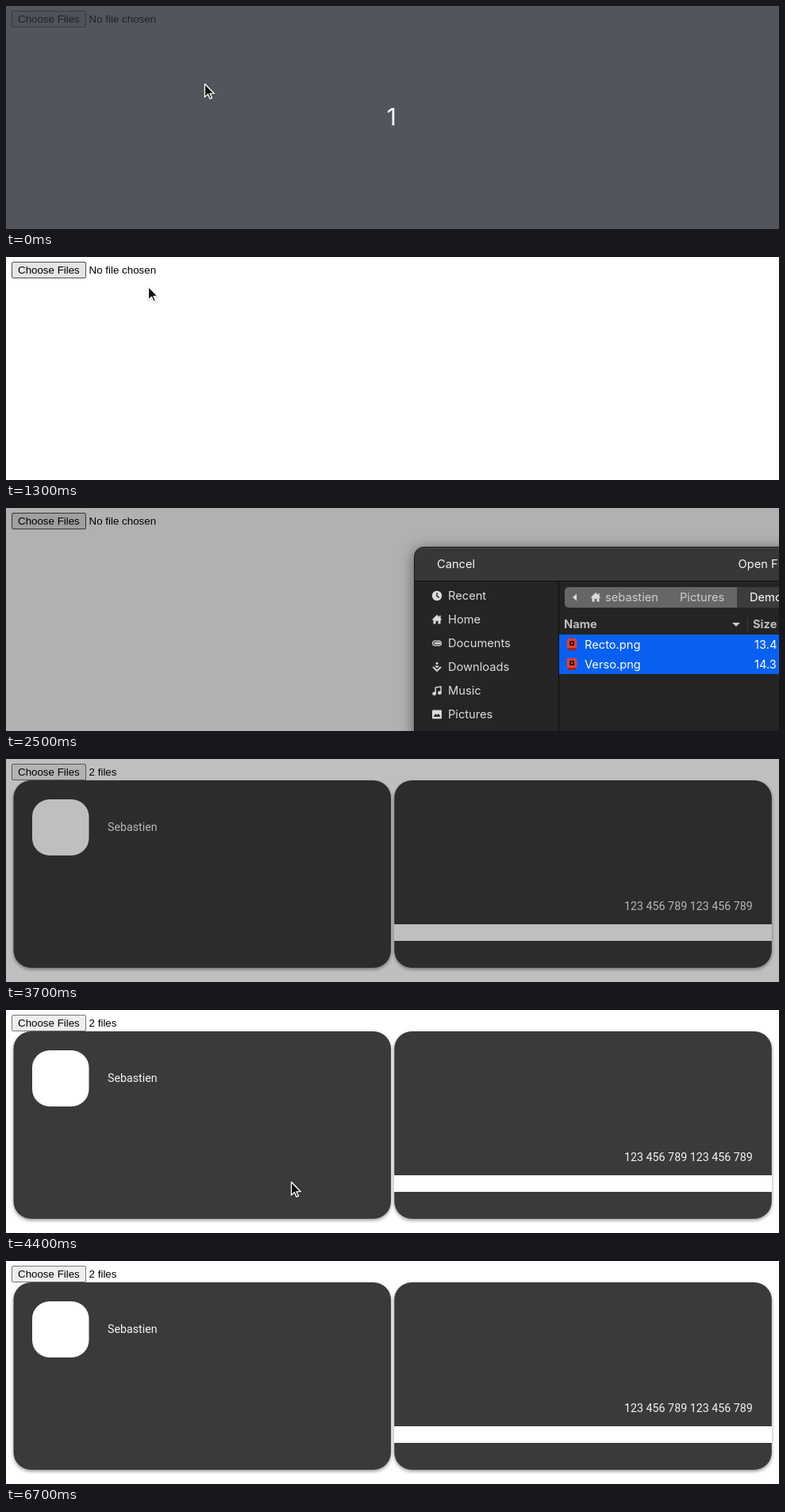
An HTML page with a canvas for the animation above (7.1 s loop, 974 by 282 pixels).

```html
<!DOCTYPE html>
<html lang="en">
<head>
<meta charset="utf-8">
<title>File upload preview</title>
<style>
  html, body { margin: 0; width: 100%; height: 100%; overflow: hidden; background: #fff; }
  canvas { display: block; width: 974px; height: 282px; }
</style>
</head>
<body>
<canvas id="stage" width="974" height="282"></canvas>
<script>
const W = 974, H = 282, LOOP = 7100, STEP = 100;
const ctx = document.getElementById('stage').getContext('2d');
const UI = '14.667px Inter, sans-serif';
const FORM = '13.333px "Liberation Sans", Arial, sans-serif';
const CARD = '14.25px Roboto, sans-serif';
const INK = '#dcdcdc', BASE = '#252525';

// Pointer moves between rests; each starts where the last one ended
const moves = [
  { from: 400, to: 1000, x: 58, y: 16 },
  { from: 1200, to: 1500, x: 525, y: 97 },
  { from: 1500, to: 2000, x: 745, y: 198 },
  { from: 2300, to: 2600, x: 1060, y: 150 },
  { from: 3700, to: 4400, x: 359, y: 217 },
  { from: 4400, to: 5200, x: 59, y: -4 },
  { from: 5200, to: 5700, x: 57, y: -22 },
  { from: 6100, to: 6300, x: 55, y: 3 },
  { from: 6400, to: 6700, x: 55, y: -24 }
];

const progress = (t, from, to) => Math.max(0, Math.min(1, (t - from) / (to - from)));
const smooth = k => k * k * (3 - 2 * k);

function pointer(t) {
  let x = 250, y = 98;
  for (const m of moves) {
    const k = smooth(progress(t, m.from, m.to));
    x += (m.x - x) * k;
    y += (m.y - y) * k;
  }
  return [Math.round(x), Math.round(y)];
}

function rect(x, y, w, h, color) {
  ctx.fillStyle = color;
  ctx.fillRect(x, y, w, h);
}

function round(x, y, w, h, r, color) {
  ctx.fillStyle = color;
  ctx.beginPath();
  ctx.roundRect(x, y, w, h, r);
  ctx.fill();
}

function disc(x, y, r, color) {
  round(x - r, y - r, 2 * r, 2 * r, r, color);
}

function trace(points) {
  ctx.beginPath();
  for (let i = 0; i < points.length; i += 2) ctx.lineTo(points[i], points[i + 1]);
}

function poly(points, color) {
  trace(points);
  ctx.fillStyle = color;
  ctx.fill();
}

function line(points, color, width) {
  trace(points);
  ctx.strokeStyle = color;
  ctx.lineWidth = width;
  ctx.stroke();
}

function text(str, x, y, font, color) {
  ctx.font = font;
  ctx.fillStyle = color;
  ctx.fillText(str, x, y);
}

function withShadow(color, blur, dy, paint) {
  ctx.save();
  ctx.shadowColor = color;
  ctx.shadowBlur = blur;
  ctx.shadowOffsetY = dy;
  paint();
  ctx.restore();
}

function fileInput(hover, label) {
  round(7, 6, 94, 21, 2.5, hover ? '#4f4f4f' : '#767676');
  round(8, 7, 92, 19, 1.5, hover ? '#e5e5e5' : '#efefef');
  text('Choose Files', 15, 21, FORM, '#000');
  text(label, 104.6, 21, FORM, '#000');
}

function cards() {
  for (const x of [9.5, 489.3]) {
    withShadow('rgba(0,0,0,.42)', 4, 2, () => round(x, 27, 475.5, 237, 22, '#3a3a3a'));
  }
  round(33, 51, 71.5, 71, 22, '#fff');
  text('Sebastien', 128, 91, CARD, '#f4f4f4');
  text('123 456 789 123 456 789', 779, 191, CARD, '#f4f4f4');
  rect(489, 209, 476, 21, '#fff');
}

// Icons are drawn around their own centre
const icons = {
  Recent() {
    disc(0, 0, 6.2, INK);
    line([0, -3.8, 0, 0.3, 2.8, 2.4], BASE, 1.5);
  },
  Home() {
    poly([-6.5, 0.5, 0, -6, 6.5, 0.5], INK);
    rect(-4.5, 0, 3, 5.5, INK);
    rect(1.5, 0, 3, 5.5, INK);
    rect(-1.5, 0, 3, 2, INK);
    rect(3, -5, 1.6, 4, INK);
  },
  Documents() {
    round(-6, -3.5, 12, 7, 3.5, INK);
    round(-4.8, -2.3, 9.6, 4.6, 2.3, BASE);
    round(-3.5, -1.2, 8, 2.4, 1.2, INK);
  },
  Downloads() {
    disc(0, -4.5, 1.5, INK);
    poly([-3, -1.5, 3, -1.5, 0, 1.5], INK);
    line([-5, 0, 0, 5, 5, 0], INK, 1.8);
  },
  Music() {
    disc(-3.4, 3.8, 2.3, INK);
    disc(3.4, 2.8, 2.3, INK);
    line([-1.8, 4, -1.8, -4, 5, -5.2, 5, 3], INK, 1.4);
  },
  Pictures() {
    round(-6, -5.5, 12, 11, 1, INK);
    poly([-4.5, 3, -1.8, -1, 0, 1, 2, -1, 4.5, 3], BASE);
  }
};

function icon(name, x, y) {
  ctx.save();
  ctx.translate(x, y);
  icons[name]();
  ctx.restore();
}

function fileRow(y, name, size, picked) {
  ctx.globalAlpha = picked;
  rect(697, y, 277, 25, '#0860f2');
  ctx.globalAlpha = 1;
  rect(708, y + 17, 10, 3, '#a3231a');
  round(707, y + 5, 12, 12, 1.5, '#f83c28');
  rect(710, y + 8, 6, 6, '#3a1513');
  rect(712, y + 10, 2, 2, '#f83c28');
  const color = picked > 0.5 ? '#fff' : INK;
  text(name, 729, y + 18, UI, color);
  text(size, 943, y + 18, UI, color);
}

function dialog(second) {
  const bold = '700 ' + UI;
  withShadow('rgba(0,0,0,.5)', 17, 3, () => round(514, 49, 900, 560, 13, '#161616'));
  round(515, 50, 900, 560, 12, '#4b4b4b');
  round(515, 51, 900, 42, [12, 0, 0, 0], '#373737');
  rect(515, 92, 459, 190, '#101010');
  rect(515, 93, 181, 189, BASE);
  rect(697, 93, 277, 189, '#242424');
  text('Cancel', 543, 76, UI, '#f4f4f4');
  text('Open Files', 922.6, 76, UI, '#f4f4f4');

  Object.keys(icons).forEach((name, i) => {
    const y = 111 + i * 30;
    icon(name, 543, y);
    text(name, 557, y + 5, UI, INK);
  });

  round(704, 100, 290, 26, 5, '#666');
  rect(921, 100, 60, 26, '#3c3c3c');
  poly([714, 113, 719, 108.5, 719, 117.5], INK);
  icon('Home', 743, 113);
  text('sebastien', 755, 118, UI, '#cfcfcf');
  text('Pictures', 849, 118, UI, '#cfcfcf');
  text('Demo', 937, 118, UI, '#fff');

  text('Name', 703, 152, bold, '#bdbdbd');
  poly([915, 145, 925, 145, 920, 150], '#c8c8c8');
  rect(934, 139, 1, 16, '#3a3a3a');
  text('Size', 941, 152, bold, '#bdbdbd');
  fileRow(160, 'Recto.png', '13.4 kB', 1);
  fileRow(185, 'Verso.png', '14.3 kB', second);
}

function arrow(x, y) {
  ctx.save();
  ctx.translate(x + 0.5, y + 0.5);
  const shape = [0, 0, 0, 16.5, 4, 13, 6.5, 18.8, 9, 17.7, 6.5, 12.2, 11.5, 12, 0, 0];
  withShadow('rgba(0,0,0,.3)', 2, 1, () => line(shape, '#fff', 1.2));
  poly(shape, '#111');
  line(shape, '#fff', 1.2);
  ctx.restore();
}

function draw(t) {
  const [x, y] = pointer(t), done = t >= 3700;
  const over = x > 7 && x < 101 && y > 6 && y < 27;
  rect(0, 0, W, H, '#fff');
  if (done) cards();
  fileInput(!done && (over || t > 1200), done ? '2 files' : 'No file chosen');

  // The page darkens while the dialog is open
  const dim = progress(t, 1315, 1815) - progress(t, 3654, 3904);
  rect(0, 0, W, H, `rgba(0,0,0,${0.306 * dim})`);
  if (t >= 1400 && !done) dialog(progress(t, 1900, 2200));

  if (t < 400) {
    rect(0, 0, W, H, 'rgba(41,43,53,.8)');
    text('1', 479.8, 151, '30px Inter, sans-serif', '#fff');
  }
  arrow(x, y);
}

function tick() {
  const t = performance.now() % LOOP;
  draw(Math.floor(t / STEP) * STEP);
  requestAnimationFrame(tick);
}
tick();
</script>
</body>
</html>
```
